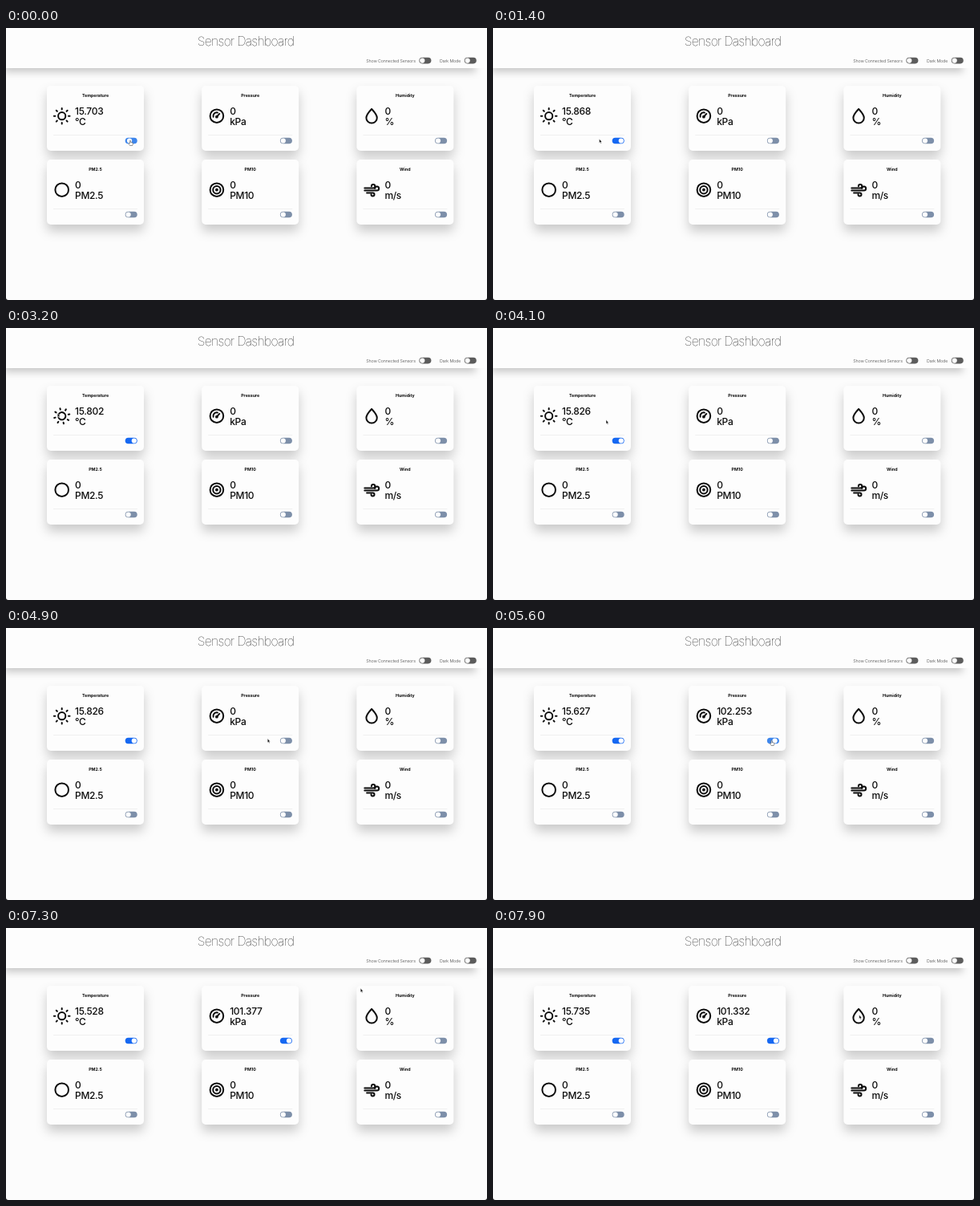
Animation of 600x339 px, one loop 8000 ms. Source, as an HTML page:

```html
<!DOCTYPE html>
<html lang="en">
<meta charset="utf-8">
<title>Sensor Dashboard</title>
<style>
html, body { margin: 0; width: 100%; height: 100%; overflow: hidden; background: #fcfcfc; }
svg { display: block; width: 600px; height: 339px; font-family: Inter, Roboto, sans-serif; fill: #0c0c0c; }
.header { fill: #fdfdfd; filter: drop-shadow(0 5px 5px #0003); }
.card { fill: #fdfdfd; filter: drop-shadow(0 8px 7px #0003); }
.title { font-size: 15.8px; font-weight: 100; letter-spacing: -.72px; text-anchor: middle; }
.label { font-size: 5.3px; font-weight: 300; letter-spacing: -.11px; fill: #444; }
.name { font-size: 5.3px; font-weight: 700; text-anchor: middle; }
.value { font-size: 12px; font-weight: 450; letter-spacing: -.32px; }
.icon { fill: none; stroke: #0c0c0c; stroke-width: 2; stroke-linecap: round; stroke-linejoin: round; }
.solid { fill: #0c0c0c; stroke: none; }
</style>
<svg id="stage" viewBox="0 0 600 339"></svg>
<script>
const stage = document.getElementById('stage');
const ring = r => `<circle r="${r}"/>`;
const path = d => `<path d="${d}"/>`;
const rays = [...Array(8).keys()].map(i => `<path d="M0-8.3V-9.8" transform="rotate(${i * 45})"/>`).join('');

const sensors = [
  ['Temperature', '°C', `<g id="sun">${ring(4.6)}${rays}</g>`],
  ['Pressure', 'kPa', ring(8.3) + path('M-4.3 1A4.3 4.3 0 0 1 1-4.2M0 1L3.4-2.8') + '<circle class="solid" cy="1" r="1.9"/>'],
  ['Humidity', '%', path('M0-8.8C-2.5-6-6.7-2-6.7 2.2A6.7 6.7 0 0 0 6.7 2.2C6.7-2 2.5-6 0-8.8Z')],
  ['PM2.5', 'PM2.5', ring(8.3)],
  ['PM10', 'PM10', ring(8.3) + ring(4.7) + '<circle class="solid" r="1.9"/>'],
  ['Wind', 'm/s', path('M-8.8-2.3H2A2.2 2.2 0 1 0-.2-4.5M-8.8 .8H6.6A2.5 2.5 0 1 0 4.1-1.7M-6 3.9H1.4A2 2 0 1 1-.6 5.9')]
];

const toggle = (x, y, color, id = '') => `<g id="${id}" transform="translate(${x} ${y})">
  <rect width="15" height="7.6" rx="3.8" fill="${color}"/>
  <circle cx="3.9" cy="3.8" r="3.1" fill="#fff"/></g>`;

const card = ([name, unit, icon], i) => `<g transform="translate(${51 + i % 3 * 193.2} ${72 + (i / 3 | 0) * 92})">
  <rect class="card" width="121" height="81" rx="5"/>
  <text class="name" x="60.5" y="14.2">${name}</text>
  <g class="icon" transform="translate(18.7 37.7)">${icon}</g>
  <text class="value" id="value${i}" x="35" y="35.5">0</text>
  <text class="value" x="35" y="48.8">${unit}</text>
  <path d="M8 61.5H113" stroke="#eee" stroke-width=".8"/>
  ${toggle(97.7, 64.7, '#7d8fa9', 'toggle' + i)}</g>`;

stage.innerHTML = `
  <rect class="header" x="-2" y="-10" width="588" height="60"/>
  <rect width="600" height="50" fill="#fdfdfd"/>
  <text class="title" x="299" y="21.6">Sensor Dashboard</text>
  <text class="label" x="449.3" y="42.6">Show Connected Sensors</text>
  <text class="label" x="541" y="42.6">Dark Mode</text>
  ${toggle(515.4, 36.8, '#5c5c5c')}${toggle(571.8, 36.8, '#5c5c5c')}
  ${sensors.map(card).join('')}
  <path d="M0 336Q0 339 3 339H0ZM600 336Q600 339 597 339H600Z"/>
  <g id="cursor" stroke-width=".5">
    <path id="arrow" stroke="#fff" d="M0 0V5L1.1 4.1L1.9 5.8L2.8 5.4L2 3.8H3.4Z"/>
    <path id="hand" fill="#fff" stroke="#333" d="M-.6 0Q0-.8.6 0V2L3 2.6Q3.6 3 3.3 4.2L2.7 6H-.4L-2.2 3.6Q-1.8 2.7-.6 3.4Z"/>
  </g>`;

const el = id => document.getElementById(id);
const pressureOn = 5350;

// time, temperature, pressure
const readings = [
  [0, 15.703, 0], [1000, 15.868, 0], [2200, 15.802, 0], [3800, 15.826, 0],
  [pressureOn, 15.627, 102.253], [6500, 15.528, 101.377], [7600, 15.735, 101.332]
];
// time, x, y
const route = [
  [0, 155, 140.5], [400, 155, 140.5], [1400, 132.5, 138.2], [2100, 64.3, 106], [3250, 64.3, 106], [4100, 141, 114.4],
  [5100, 347.5, 140.5], [5800, 347.5, 140.5], [6700, 423, 123], [7100, 440, 70], [8000, 457.3, 109.5]
];

const clamp = v => Math.max(0, Math.min(1, v));
const ease = v => v * v * (3 - 2 * v);
const mix = (a, b, k) => a + (b - a) * k;

function cursorAt(t) {
  const i = route.findIndex(([time]) => time > t);
  const [t0, x0, y0] = route[i - 1], [t1, x1, y1] = route[i];
  const k = ease((t - t0) / (t1 - t0));
  return [mix(x0, x1, k), mix(y0, y1, k)];
}

function setToggle(i, t, start, hover) {
  const [track, knob] = el('toggle' + i).children;
  const lit = clamp((t - start) / 100);
  const on = hover ? [62, 134, 236] : [22, 104, 242];
  track.setAttribute('fill', `rgb(${[125, 143, 169].map((c, n) => Math.round(mix(c, on[n], lit)))})`);
  knob.setAttribute('cx', mix(3.9, 11.1, ease(clamp((t - start) / 350))));
}

function draw(t) {
  const [, temperature, pressure] = readings.findLast(([start]) => start <= t);
  el('value0').textContent = temperature.toFixed(3);
  el('value1').textContent = pressure ? pressure.toFixed(3) : '0';

  const [x, y] = cursorAt(t);
  const over = left => x > left && x < left + 15 && y > 136.7;
  const hovers = [over(148.7), over(341.9)];
  setToggle(0, t, -100, hovers[0]);
  setToggle(1, t, pressureOn, hovers[1]);
  const pointing = hovers.includes(true);
  el('hand').style.display = pointing ? '' : 'none';
  el('arrow').style.display = pointing ? 'none' : '';
  el('cursor').setAttribute('transform', `translate(${x} ${y})`);

  const angle = t > 2025 && t < 3300 ? (t - 2025) * .18 : 0;
  el('sun').setAttribute('transform', `rotate(${angle})`);
}

const begin = performance.now();
(function frame() {
  draw((performance.now() - begin) % 8000);
  requestAnimationFrame(frame);
})();
</script>
</html>
```
